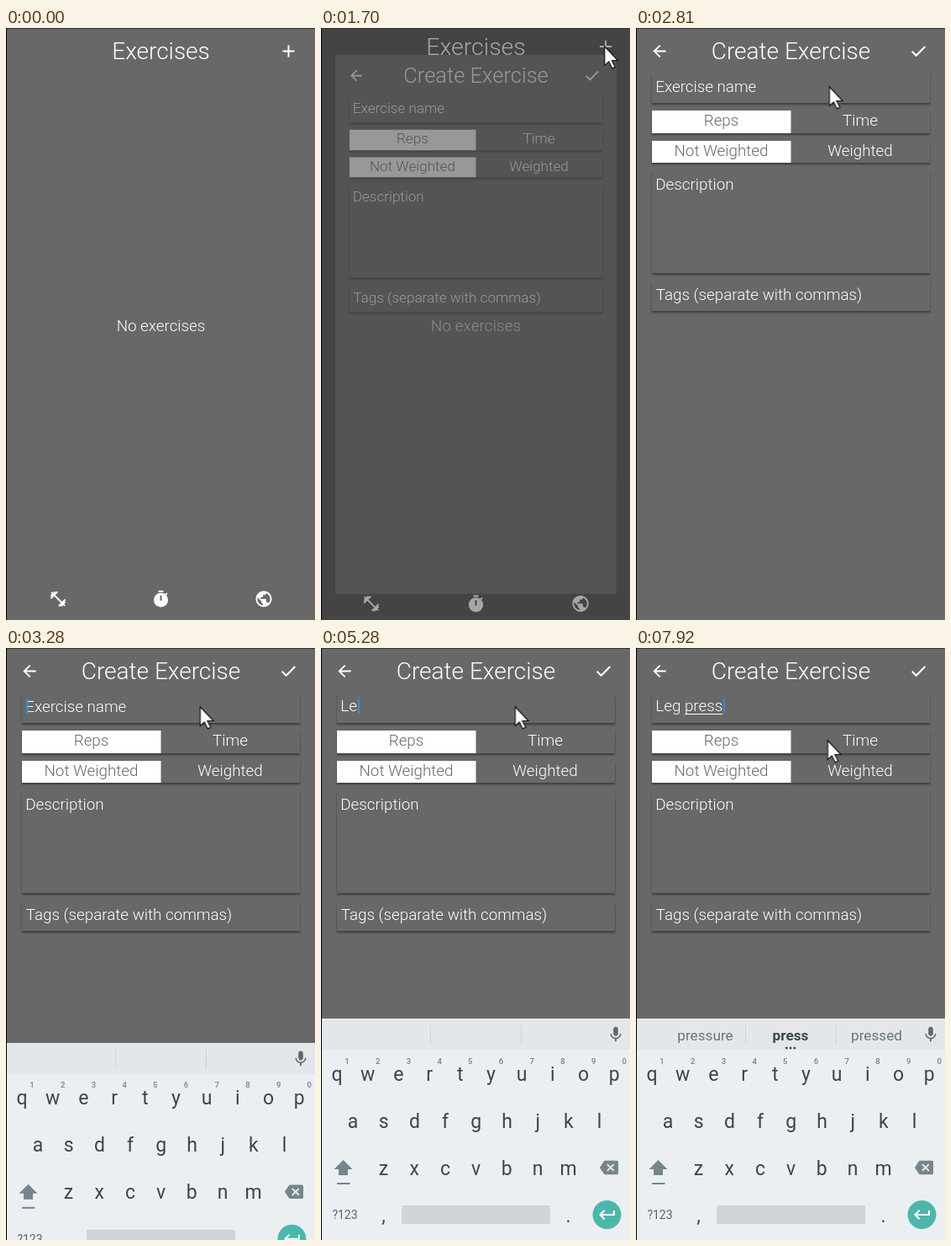
Write an HTML page that moves like this. It is 368 by 703 pixels and loops after 7.99 s.

```html
<!DOCTYPE html>
<html lang="en">
<head>
<meta charset="utf-8">
<title>Create exercise</title>
<style>
html, body { margin: 0; width: 100%; height: 100%; overflow: hidden; background: #000; }
#stage { position: relative; width: 368px; height: 703px; overflow: hidden; font-family: Roboto, sans-serif; }
svg { position: absolute; left: 0; top: 0; }
text { font-size: 18.8px; font-weight: 300; fill: #fff; }
.mid { text-anchor: middle; }
.title { font-size: 28px; text-anchor: middle; }
.bg, .field { fill: #686868; }
.field { filter: drop-shadow(0 2px 1.2px rgba(0, 0, 0, .42)); }
.on { fill: #fff; }
.off { fill: #686868; }
.line { fill: none; stroke: #fff; stroke-width: 2; }
.icon { fill: #fff; }
.screen { transform-origin: 184.5px 352px; }

#stage [class*="a-"] { animation: 7990ms linear infinite; }
#stage .a-list { animation-name: list; }
#stage .a-form { animation-name: form; }
#stage .a-keys { animation-name: keys; }
#stage .a-mouse { animation-name: mouse; }
#stage .a-hint, #stage .a-type, #stage .a-spot, #stage .a-caret,
#stage .a-first, #stage .a-second, #stage .a-under { animation-timing-function: step-end; }
#stage .a-hint { animation-name: hint; }
#stage .a-type { animation-name: type; }
#stage .a-spot { animation-name: spot; }
#stage .a-caret { animation-name: blink; }
#stage .a-first { animation-name: first; }
#stage .a-second { animation-name: second; }
#stage .a-under { animation-name: under; }

@keyframes list {
  0%, 20.4% { opacity: 1; transform: none; }
  23%, 100% { opacity: 0; transform: scale(1.05); }
}
@keyframes form {
  0%, 20.4% { opacity: 0; transform: scale(.85); }
  21.28% { opacity: .45; transform: scale(.91); }
  22.15% { opacity: .85; transform: scale(.95); }
  23.03% { opacity: 1; transform: scale(.975); }
  24.65% { opacity: 1; transform: scale(.994); }
  27%, 100% { opacity: 1; transform: none; }
}
@keyframes keys {
  0%, 38.7% { transform: translateY(264px); animation-timing-function: cubic-bezier(.1, .4, .2, 1); }
  43.4%, 100% { transform: none; }
}
@keyframes mouse {
  0%, 3.99% { opacity: 0; transform: translate(338px, 551px); }
  4% { opacity: 1; transform: translate(338px, 551px); }
  4.88% { transform: translate(338.5px, 468px); }
  5.76% { transform: translate(337px, 378px); }
  6.63%, 9.1% { transform: translate(336px, 329px); }
  9.88% { transform: translate(336px, 308px); }
  10.76% { transform: translate(335px, 230px); }
  11.64% { transform: translate(334px, 150px); }
  12.51% { transform: translate(334px, 98px); }
  13.39% { transform: translate(333px, 70px); }
  15.02% { transform: translate(336px, 45px); }
  16.27% { transform: translate(342px, 30px); }
  19.52%, 26.4% { transform: translate(337px, 21px); }
  30.04% { transform: translate(259px, 51px); }
  32.67%, 35.17% { transform: translate(229.5px, 69px); }
  36.79%, 92.99% { transform: translate(230.5px, 69px); }
  94.74% { transform: translate(233px, 76px); }
  97% { transform: translate(231px, 97px); }
  99.12%, 100% { opacity: 1; transform: translate(227.5px, 109px); }
}
@keyframes hint { 0% { visibility: visible; } 65.2%, 100% { visibility: hidden; } }
@keyframes type {
  0% { width: 0; }
  65.2% { width: 10px; }
  66.08% { width: 20px; }
  66.95% { width: 30.5px; }
  76.97% { width: 35px; }
  78.72% { width: 45.5px; }
  79.59% { width: 52px; }
  80.47% { width: 62px; }
  82.1% { width: 71.5px; }
  82.97%, 100% { width: 82px; }
}
@keyframes spot {
  0% { transform: none; }
  65.2% { transform: translateX(10px); }
  66.08% { transform: translateX(20px); }
  66.95% { transform: translateX(30px); }
  76.97% { transform: translateX(35px); }
  78.72% { transform: translateX(45px); }
  79.59% { transform: translateX(51px); }
  80.47% { transform: translateX(61px); }
  82.1% { transform: translateX(71px); }
  82.97%, 100% { transform: translateX(80px); }
}
@keyframes blink {
  0% { opacity: 0; }
  36.79% { opacity: 1; }
  43.05% { opacity: 0; }
  48.68% { opacity: 1; }
  54.44% { opacity: 0; }
  61.07% { opacity: 1; }
  75.34% { opacity: 0; }
  76.97% { opacity: 1; }
  91.36% { opacity: 0; }
  97.62%, 100% { opacity: 1; }
}
@keyframes first { 0% { visibility: hidden; } 68.58% { visibility: visible; } 78.72%, 100% { visibility: hidden; } }
@keyframes under { 0% { visibility: hidden; } 68.58% { visibility: visible; } 76.97%, 100% { visibility: hidden; } }
@keyframes second { 0% { visibility: hidden; } 83.72%, 100% { visibility: visible; } }

.typed { position: absolute; left: 23.3px; top: 58px; height: 24px; overflow: hidden; white-space: pre;
  color: #fff; font-weight: 300; font-size: 18.8px; line-height: 23px; }
.typed span { position: relative; }
.typed i { position: absolute; left: 0; right: 0; bottom: 1px; height: 1px; background: #fff; }
.spot { position: absolute; left: 24px; top: 60px; }
.caret { width: 2px; height: 18px; background: #2f8fdc; }

.keys text { font-weight: 400; fill: #37474f; text-anchor: middle; }
.keys .key { font-size: 23px; }
.keys .num { font-size: 9.5px; font-weight: 500; fill: #74828a; }
.keys .tip { font-size: 17.2px; fill: #66757d; }
.keys .best { font-weight: 700; fill: #37474f; }
.grey { fill: #75858d; }
</style>
</head>
<body>
<div id="stage">
  <svg width="368" height="703">
    <g class="screen a-list">
      <rect class="bg" x="1" y="1" width="367" height="702"/>
      <text class="title" x="184.5" y="37">Exercises</text>
      <path class="line" d="M329.5 27.5h14M336.5 20.5v14"/>
      <text class="mid" x="184.5" y="360">No exercises</text>
      <path class="icon" transform="translate(62 678) scale(.93) translate(-12 -12)" d="M20.57 14.86L22 13.43 20.57 12 17 15.57 8.43 7 12 3.43 10.57 2 9.14 3.43 7.71 2 5.57 4.14 4.14 2.71 2.71 4.14l1.43 1.43L2 7.71l1.43 1.43L2 10.57 3.43 12 7 8.43 15.57 17 12 20.57 13.43 22l1.43-1.43L16.29 22l2.14-2.14 1.43 1.43 1.43-1.43-1.43-1.43L22 16.29z"/>
      <circle class="icon" cx="184.5" cy="679.3" r="8.5"/>
      <path class="line" d="M181.5 669h6M190 673l1.8-1.8"/>
      <path d="M184.5 674v6" stroke="#686868" stroke-width="2"/>
      <path class="icon" transform="translate(307 678) scale(.95) translate(-12 -12)" d="M12 2C6.48 2 2 6.48 2 12s4.48 10 10 10 10-4.48 10-10S17.52 2 12 2zm-1 17.93c-3.95-.49-7-3.85-7-7.93 0-.62.08-1.21.21-1.79L9 15v1c0 1.1.9 2 2 2v1.93zm6.9-2.54c-.26-.81-1-1.39-1.9-1.39h-1v-3c0-.55-.45-1-1-1H8v-2h2c.55 0 1-.45 1-1V7h2c1.1 0 2-.9 2-2v-.41c2.93 1.19 5 4.06 5 7.41 0 2.08-.8 3.97-2.1 5.39z"/>
    </g>

    <g class="screen a-form">
      <rect class="bg" x="1" y="1" width="367" height="702"/>
      <rect class="field" x="19" y="54" width="331" height="35"/>
      <rect class="field" x="19" y="98" width="331" height="27"/>
      <rect class="field" x="19" y="134" width="331" height="26"/>
      <rect class="field" x="19" y="170" width="331" height="121"/>
      <rect class="field" x="19" y="301" width="331" height="35"/>
      <rect class="bg" x="15" y="40" width="339" height="13"/>
      <path class="on" d="M19 98h165.500v27H19zM19 134h165.500v26H19z"/>
      <path class="icon" transform="translate(28 27.500) scale(.95) translate(-12 -12)" d="M20 11H7.83l5.59-5.59L12 4l-8 8 8 8 1.41-1.41L7.83 13H20v-2z"/>
      <text class="title" x="184.5" y="37">Create Exercise</text>
      <path class="line" d="M328.700 27.800l5 5L344.300 22"/>
      <text class="a-hint" x="23.3" y="76">Exercise name</text>
      <text class="mid off" x="101.5" y="116">Reps</text>
      <text class="mid" x="267" y="116">Time</text>
      <text class="mid off" x="101.500" y="152">Not Weighted</text>
      <text class="mid" x="267" y="152">Weighted</text>
      <text x="23.3" y="192">Description</text>
      <text x="23.8" y="323">Tags (separate with commas)</text>
    </g>

    <g class="keys a-keys">
      <rect x="1" y="440" width="367" height="263" fill="#eceff1"/>
      <rect x="1" y="440" width="367" height="37" fill="#e4e7e9"/>
      <path d="M130.500 448v23M238.500 448v23" stroke="#cdd2d5"/>
      <path fill="#5c6970" transform="translate(351 459) scale(.93) translate(-12 -12)" d="M12 14c1.660 0 2.990-1.340 2.990-3L15 5c0-1.660-1.340-3-3-3S9 3.340 9 5v6c0 1.660 1.340 3 3 3zm5.300-3c0 3-2.540 5.100-5.300 5.100S6.700 14 6.700 11H5c0 3.410 2.720 6.230 6 6.720V21h2v-3.280c3.280-.480 6-3.300 6-6.720h-1.700z"/>
      <g class="a-first">
        <text class="tip" x="82" y="466">leg</text>
        <text class="tip best" x="184" y="466">Leg</text>
        <text class="tip" x="286.5" y="466">Legs</text>
        <path d="M178.500 475h2m2.500 0h2m2.500 0h2" stroke="#37474f" stroke-width="2.200"/>
      </g>
      <g class="a-second">
        <text class="tip" x="82.5" y="466">pressure</text>
        <text class="tip best" x="184" y="466">press</text>
        <text class="tip" x="286.5" y="466">pressed</text>
        <path d="M178 475h2.500m2.300 0h2.500m2.300 0h2.500" stroke="#37474f" stroke-width="2.500"/>
      </g>
      <g id="letters"></g>
      <path class="grey" d="M26.500 608l11 11h-5.500v7h-11v-7h-5.500zM19 635h15.500v2H19z"/>
      <path class="grey" transform="translate(343 617) scale(.92) translate(-12 -12)" d="M22 3H7c-.69 0-1.230.35-1.590.88L0 12l5.410 8.110c.36.53.9.89 1.590.89h15c1.100 0 2-.9 2-2V5c0-1.100-.9-2-2-2zm-3 12.590L17.590 17 14 13.410 10.410 17 9 15.590 12.590 12 9 8.410 10.410 7 14 10.590 17.590 7 19 8.410 15.410 12 19 15.590z"/>
      <text x="28.5" y="678" style="font-size:14px;fill:#56656d">?123</text>
      <text class="key" x="74.5" y="682">,</text>
      <text class="key" x="294.5" y="682">.</text>
      <rect x="96" y="662" width="177" height="22" rx="2.5" fill="#cfd4d6"/>
      <circle cx="340.5" cy="673" r="17" fill="#4db6ac"/>
      <path class="icon" transform="translate(340.500 673) translate(-11.500 -12)" d="M19 7v4H5.830l3.580-3.590L8 6l-6 6 6 6 1.410-1.410L5.830 13H21V7z"/>
    </g>
    <path d="M0 .5h368" stroke="#343434"/>
    <path d="M.5 0v703" stroke="#000"/>
  </svg>

  <div class="typed a-type"><span>Leg<i class="a-under"></i></span> <span>press<i class="a-second"></i></span></div>
  <div class="spot a-spot"><div class="caret a-caret"></div></div>

  <svg width="368" height="703">
    <path class="a-mouse" d="M.8.800v22.700l5-4.600 4 8 3.500-1.700-3.900-7.700h7z" fill="#fff" stroke="#111" stroke-width="1.200"/>
  </svg>
</div>
<script>
const letters = document.getElementById("letters");
const pitch = 36.7;

function label(text, x, y, cls) {
  const node = document.createElementNS("http://www.w3.org/2000/svg", "text");
  node.setAttribute("x", x);
  node.setAttribute("y", y);
  node.setAttribute("class", cls);
  node.textContent = text;
  letters.append(node);
}
function row(chars, x, y, cls) {
  [...chars].forEach((c, i) => label(c, x + i * pitch, y, cls));
}
row("qwertyuiop", 19, 513.5, "key");
row("1234567890", 31, 493.5, "num");
row("asdfghjkl", 38, 569.5, "key");
row("zxcvbnm", 74.5, 625.5, "key");
</script>
</body>
</html>
```
